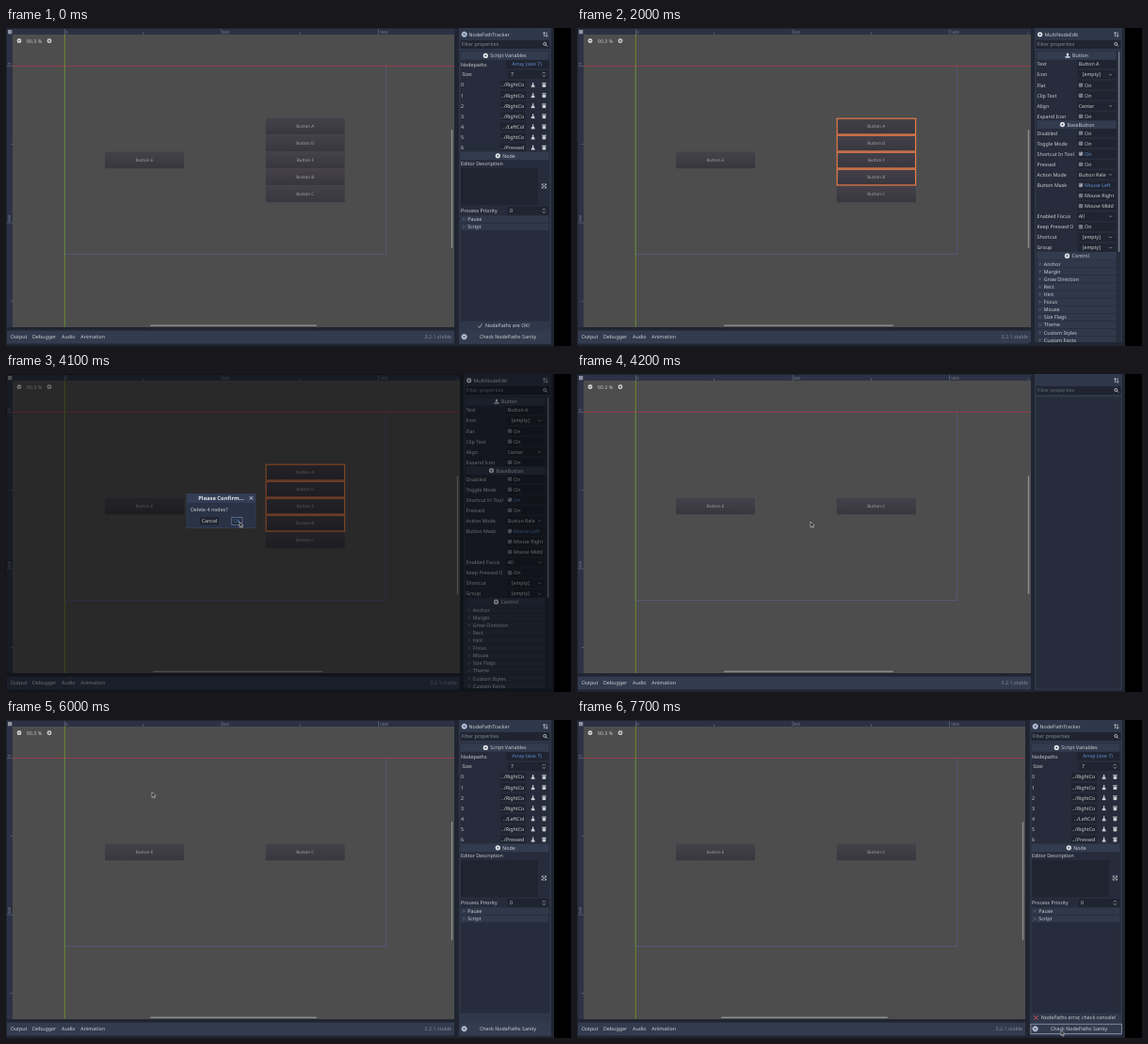
Animation of 600 by 338 pixels, one loop 8 s. Source, as an HTML page:

```html
<!DOCTYPE html>
<html lang="en">
<head>
<meta charset="utf-8">
<title>Node path editor</title>
<style>
html, body { margin: 0; width: 100%; height: 100%; overflow: hidden; background: #000; }
svg { display: block; width: 600px; height: 338px; }
text { font-family: "Noto Sans", "Open Sans", sans-serif; font-size: 5.3px; text-rendering: geometricPrecision; white-space: pre; }
.game { font-size: 4.6px; }
.tick { font-size: 4px; }
.title { font-size: 5.8px; font-weight: 700; }
</style>
</head>
<body>
<svg id="stage" viewBox="0 0 600 338"></svg>
<script>
const LOOP = 8000, STEP = 100;
const C = {
  edge: '#202531', panel: '#2f374a', bar: '#333b4f', tree: '#262c3b', field: '#1f2430',
  text: '#cdcfd2', dim: '#7b8291', blue: '#6390d4', orange: '#e97c48', error: '#ee5b52'
};

// Drawing helpers; text is placed by its vertical centre
const rect = (x, y, w, h, fill, more = '') =>
  `<rect x="${x}" y="${y}" width="${w}" height="${h}" fill="${fill}" ${more}/>`;
const frame = (x, y, w, h, color, width) =>
  rect(x, y, w, h, 'none', `stroke="${color}" stroke-width="${width}"`);
const path = (d, color = C.text, width = .7, fill = 'none') =>
  `<path d="${d}" fill="${fill}" stroke="${color}" stroke-width="${width}"/>`;
const text = (x, y, s, fill = C.text, anchor = 'start', cls = '') =>
  `<text x="${x}" y="${y + 1.9}" fill="${fill}" text-anchor="${anchor}" class="${cls}">${s}</text>`;
const dot = (x, y, r, fill) => `<circle cx="${x}" cy="${y}" r="${r}" fill="${fill}"/>`;
const move = (x, y, s) => `<g transform="translate(${x} ${y})">${s}</g>`;

const icons = {
  gear: `<circle r="2.1" fill="none" stroke="#c3d0ea" stroke-width="1.3"/>` +
    `<circle r="2.9" fill="none" stroke="#c3d0ea" stroke-width=".7" stroke-dasharray="1 1.28"/>` +
    path('M-2 0H2M0-2V2', '#c3d0ea', .5),
  ring: dot(0, 0, 2.6, '#e4e6ea') + dot(0, 0, .9, C.bar),
  press: rect(-2.5, .8, 5, 1.5, '#d5e0f5') + rect(-1.1, -2.5, 2.2, 2.8, '#d5e0f5'),
  sort: path('M-1.3 2.5V-2.3M-2.5-1L-1.3-2.5L-.1-1M1.3-2.5V2.3M.1 1L1.3 2.5L2.5 1'),
  find: `<circle cx="-.4" cy="-.5" r="1.5" fill="none" stroke="${C.text}" stroke-width=".8"/>` +
    path('M.7.6L2.3 2.2', C.text, .9),
  down: path('M-1.4-.7L0 .7L1.4-.7', '#a9adb5'),
  more: path('M-.7-1.2L.5 0L-.7 1.2', '#8f95a2', .6),
  spin: path('M-1.5-.8L0-2.3L1.5-.8M-1.5.8L0 2.3L1.5.8', '#a9adb5', .8),
  brush: path('M0-2.5V0', C.text, 1.2) + path('M-1.3.1H1.3L1.8 2.3H-1.8Z', C.text, .3, C.text),
  trash: rect(-2.2, -2.3, 4.4, 1.1, C.text) + rect(-1.8, -.8, 3.6, 3.2, C.text),
  grow: path('M-2.2-.6V-2.2H-.6M.6-2.2H2.2V-.6M2.2.6V2.2H.6M-.6 2.2H-2.2V.6M-2-2L2 2M2-2L-2 2', C.text, .7)
};
const icon = (name, x, y) => move(x, y, icons[name]);

function gameButton(x, y, name) {
  return rect(x, y, 84, 17.6, 'url(#face)', 'rx="1"') +
    text(x + 42, y + 8.8, 'Button ' + name, '#a5a3a8', 'middle', 'game');
}

function viewport(right, s) {
  const shift = right === 482, barX = right - 3.2;
  let out = rect(0, 0, 600, 338, C.edge) + rect(582, 0, 18, 338, '#000');
  out += rect(1, 1, right - 1, 6, '#2c3244') + rect(1, 1, 6, 317, '#2c3244');
  out += rect(7, 7, right - 7, 311, '#4d4d4d') + rect(2, 2, 4.3, 4.3, '#8e93a0');
  for (let i = 0; i < 6; i++) {
    const x = 62 + i * 83.35, y = 40 + i * 83.35, n = i % 2 ? 4.5 : 1;
    if (x < right) out += rect(x, n, .6, 7 - n, '#6d7487');
    if (y < 318) out += rect(n, y, 7 - n, .6, '#6d7487');
    if (i % 2 === 0) {
      out += text(x + 1.3, 3.6, i * 250, '#868c9a', 'start', 'tick');
      if (y < 318) out += `<g transform="translate(3.6 ${y - 1}) rotate(-90)">` +
        text(0, -.3, i * 250, '#868c9a', 'start', 'tick') + '</g>';
    }
  }
  out += frame(62.3, 40.4, 341, 200, '#5b5884', .8);
  out += rect(7, 40, right - 7, .9, '#9b3d4c') + rect(61.8, 7, .9, 311, '#70912c');
  out += gameButton(105, 131.6, 'E');
  [...(s.deleted ? 'C' : 'ADFBC')].forEach((name, i) => {
    out += gameButton(275.8, s.deleted ? 131.6 : 95.6 + i * 18, name);
  });
  for (let i = 0; i < s.selected; i++) out += frame(276.2, 96.2 + i * 18, 83.4, 16.8, C.orange, 1.2);
  out += dot(14, 13.7, 2.4, '#d8d8d8') + rect(12.8, 13.3, 2.4, .8, '#4d4d4d');
  out += dot(46, 13.7, 2.4, '#d8d8d8') + path('M44.7 13.7H47.3M46 12.4V15', '#4d4d4d', .8);
  out += text(30, 13.7, '90.3 %', '#c8c8c8', 'middle');
  out += rect(barX, 108, 1.5, 126, '#8b8b8b', 'rx=".7"');
  out += rect(shift ? 156 : 153, 315.4, shift ? 180 : 177, 1.5, '#8b8b8b', 'rx=".7"');
  out += rect(1, 321.5, right - 1, 14, C.bar);
  [['Output', 4.7], ['Debugger', 28], ['Audio', 59], ['Animation', 79.3]]
    .forEach(([s, x]) => out += text(x, 328.3, s));
  return out + text(right - 3, 328.3, '3.2.1.stable', '#858b98', 'end');
}

function dock(left, title, mark) {
  let out = rect(left, 0, 579 - left, 336, C.panel);
  out += rect(left + 1.5, 13, 95 - (left - 481), 9, C.field);
  out += text(left + 2.5, 17.4, 'Filter properties', title ? '#858b98' : '#666d7c');
  out += icon('find', 572.6, 17.4) + icon('sort', 572.8, 6.8);
  out += rect(left + 1.5, 24.5, 576.5 - left, 0, C.tree);
  out += rect(left + 1.5, 24.5, 95 - (left - 481), left > 481 ? 310 : 287, C.tree);
  return title ? out + icon(mark, left + 5.7, 6.8) + text(left + 10.5, 6.8, title) : out;
}

function section(x, y, w, name, mark, markX) {
  return rect(x, y - 4.3, w, 8.6, C.bar) + icon(mark, markX, y) + text(markX + 5, y, name);
}

function fold(x, y, w, name) {
  return rect(x, y - 3.7, w, 7.4, '#30384a') + icon('more', x + 3.2, y) + text(x + 7.3, y, name);
}

function check(y, label, on) {
  return rect(532.8, y - 2.2, 4.4, 4.4, '#707786', 'rx=".6"') +
    (on ? path(`M533.7 ${y}l1 1.2l1.9-2.6`, '#e6e8ec', .8) : '') +
    text(539, y, label, on ? C.blue : C.text);
}

function buttonDock(s) {
  const multi = s.selected > 1;
  let out = dock(486, multi ? 'MultiNodeEdit' : 'Button A', multi ? 'ring' : 'press');
  const rows = (y0, list) => list.forEach(([name, kind, value], i) => {
    const y = y0 + i * 11.08;
    out += text(488.5, y, name);
    out += rect(531.5, y - 4.5, 41, 9, C.field);
    if (kind === 'check') out += check(y, value || 'On', name === 'Shortcut In Tool' || value === 'Mouse Left');
    else out += text(532.7 + (value === '[empty]' ? 4 : 0), y, value);
    if (kind === 'menu') out += icon('down', 566.5, y);
  });
  out += section(488.5, 29.4, 84, 'Button', 'press', 521);
  rows(38.5, [['Text', 'line', 'Button A'], ['Icon', 'menu', '[empty]'], ['Flat', 'check'],
    ['Clip Text', 'check'], ['Align', 'menu', 'Center'], ['Expand Icon', 'check']]);
  out += section(488.5, 102.6, 84, 'BaseButton', 'ring', 515.5);
  rows(111.6, [['Disabled', 'check'], ['Toggle Mode', 'check'], ['Shortcut In Tool', 'check'],
    ['Pressed', 'check'], ['Action Mode', 'menu', 'Button Rele'], ['Button Mask', 'check', 'Mouse Left'],
    ['', 'check', 'Mouse Right'], ['', 'check', 'Mouse Midd'], ['Enabled Focus', 'menu', 'All'],
    ['Keep Pressed O', 'check'], ['Shortcut', 'menu', '[empty]'], ['Group', 'menu', '[empty]']]);
  out += section(488.5, 242.2, 84, 'Control', 'ring', 520.5);
  ['Anchor', 'Margin', 'Grow Direction', 'Rect', 'Hint', 'Focus', 'Mouse', 'Size Flags', 'Theme',
    'Custom Styles', 'Custom Fonts'].forEach((name, i) => out += fold(488.5, 250.6 + i * 8.12, 84, name));
  out += rect(480, 334, 102, 4, C.edge);
  return out + rect(574.9, 25, 1.4, 213, '#7c828f', 'rx=".7"');
}

function trackerDock(s) {
  let out = dock(481, 'NodePathTracker', 'gear');
  out += section(483, 29.4, 93.5, 'Script Variables', 'ring', 509.3);
  out += text(483, 39, 'Nodepaths') + rect(531, 34.4, 45.5, 8.6, C.field);
  out += text(553, 38.5, 'Array (size 7)', C.blue, 'middle');
  out += text(484.3, 49.3, 'Size:') + rect(532.5, 45, 44, 9, C.field);
  out += text(536, 49.3, '7') + icon('spin', 571.3, 49.3);
  for (let i = 0; i < 7; i++) {
    const y = 60.5 + i * 11.1, name = i === 4 ? 'LeftCol' : i === 6 ? 'Pressed' : 'RightCo';
    out += text(483, y, i) + rect(525, y - 4.5, 27, 9, C.field);
    out += text(550.3, y, '../' + name, C.text, 'end');
    out += icon('brush', 559.6, y) + icon('trash', 571.4, y);
  }
  out += section(483, 135.8, 93.5, 'Node', 'ring', 522.3);
  out += text(483, 144, 'Editor Description') + rect(483, 149, 82, 39, C.field);
  out += icon('grow', 571.4, 168);
  out += text(483, 194.3, 'Process Priority') + rect(532.5, 190, 44, 8.6, C.field);
  out += text(535, 194.3, '0') + icon('spin', 571.3, 194.3);
  out += fold(483, 203.1, 93.5, 'Pause') + fold(483, 211.4, 93.5, 'Script');
  if (s.ok) out += `<g opacity="${s.ok}">` + path('M501.3 316.8l1.5 1.7l2.7-4') +
    text(509, 316.5, 'NodePaths are OK!') + '</g>';
  if (s.error) out += path('M485.4 314.4l4.2 4.2m0-4.2l-4.2 4.2', C.error, .9) +
    text(492.7, 316.5, 'NodePaths error, check console!');
  out += rect(481.5, 321.8, 97, 13.4, C.bar);
  if (s.focus) out += frame(481.9, 323.2, 96.4, 10.2, '#a3a8b3', .7);
  return out + icon('gear', 486.6, 328.2) + text(533, 328.3, 'Check NodePaths Sanity', C.text, 'middle');
}

function dialog(pressed) {
  return rect(0, 0, 582, 338, '#000', 'opacity=".47"') +
    rect(191.5, 127, 74, 37, '#333d56') + rect(192.3, 137, 72.4, 26.2, '#2a3246') +
    text(228.5, 132, 'Please Confirm...', '#e6e8ec', 'middle', 'title') +
    path('M258.7 130.2l3.4 3.4m0-3.4l-3.4 3.4', '#dfe1e5', .9) +
    text(196, 144, 'Delete 4 nodes?') +
    rect(206, 152, 20, 8.4, C.edge) + text(216, 156.2, 'Cancel', C.text, 'middle') +
    rect(239.5, 152, 11.5, 8.4, C.edge) + frame(239.8, 152.3, 11, 7.9, pressed ? '#7290bd' : '#a3a8b3', .7) +
    text(245.2, 156.2, 'OK', pressed ? C.blue : C.text, 'middle');
}

// Pointer visits: [time, x, y], shown from the first to the last entry
const visits = [
  [[3400, 20, 104], [3600, 150, 138], [3800, 238, 155], [3900, 248, 157], [4500, 248, 157], [4600, 190, 128], [4700, 75, 85]],
  [[6000, 155, 76.5], [6400, 350, 210], [6800, 499, 310], [7300, 514, 329.5], [7900, 514, 329.5]]
];

function pointer(t) {
  const visit = visits.find(v => t >= v[0][0] && t <= v[v.length - 1][0]);
  if (!visit) return '';
  const i = Math.max(1, visit.findIndex(p => p[0] >= t));
  const [t0, x0, y0] = visit[i - 1], [t1, x1, y1] = visit[i], k = (t - t0) / (t1 - t0);
  return move(x0 + (x1 - x0) * k, y0 + (y1 - y0) * k,
    path('M0 0V5.8L1.3 4.7L2.2 6.7L3.2 6.2L2.3 4.3L4 4.1Z', '#dcdcdc', .6, '#222'));
}

function scene(t) {
  const s = {
    ok: t < 600 ? 1 : t < 700 ? .4 : 0,
    selected: t < 900 || t >= 4200 ? 0 : t < 1800 ? 1 : 4,
    deleted: t >= 4200,
    focus: t >= 7500,
    error: t >= 7600
  };
  const tracker = t < 900 || t >= 5600;
  return viewport(tracker ? 476 : 482, s) +
    (tracker ? trackerDock(s) : s.deleted ? dock(486) : buttonDock(s)) +
    (t >= 3300 && t < 4200 ? dialog(t >= 4100) : '') + pointer(t);
}

const stage = document.getElementById('stage');
const defs = '<defs><linearGradient id="face" x2="0" y2="1"><stop stop-color="#444149"/>' +
  '<stop offset="1" stop-color="#38363f"/></linearGradient></defs>';
const start = performance.now();
let shown = -1;

function tick() {
  const t = Math.floor(((performance.now() - start) % LOOP) / STEP) * STEP;
  if (t !== shown) stage.innerHTML = defs + scene(shown = t);
  requestAnimationFrame(tick);
}
tick();
</script>
</body>
</html>
```
